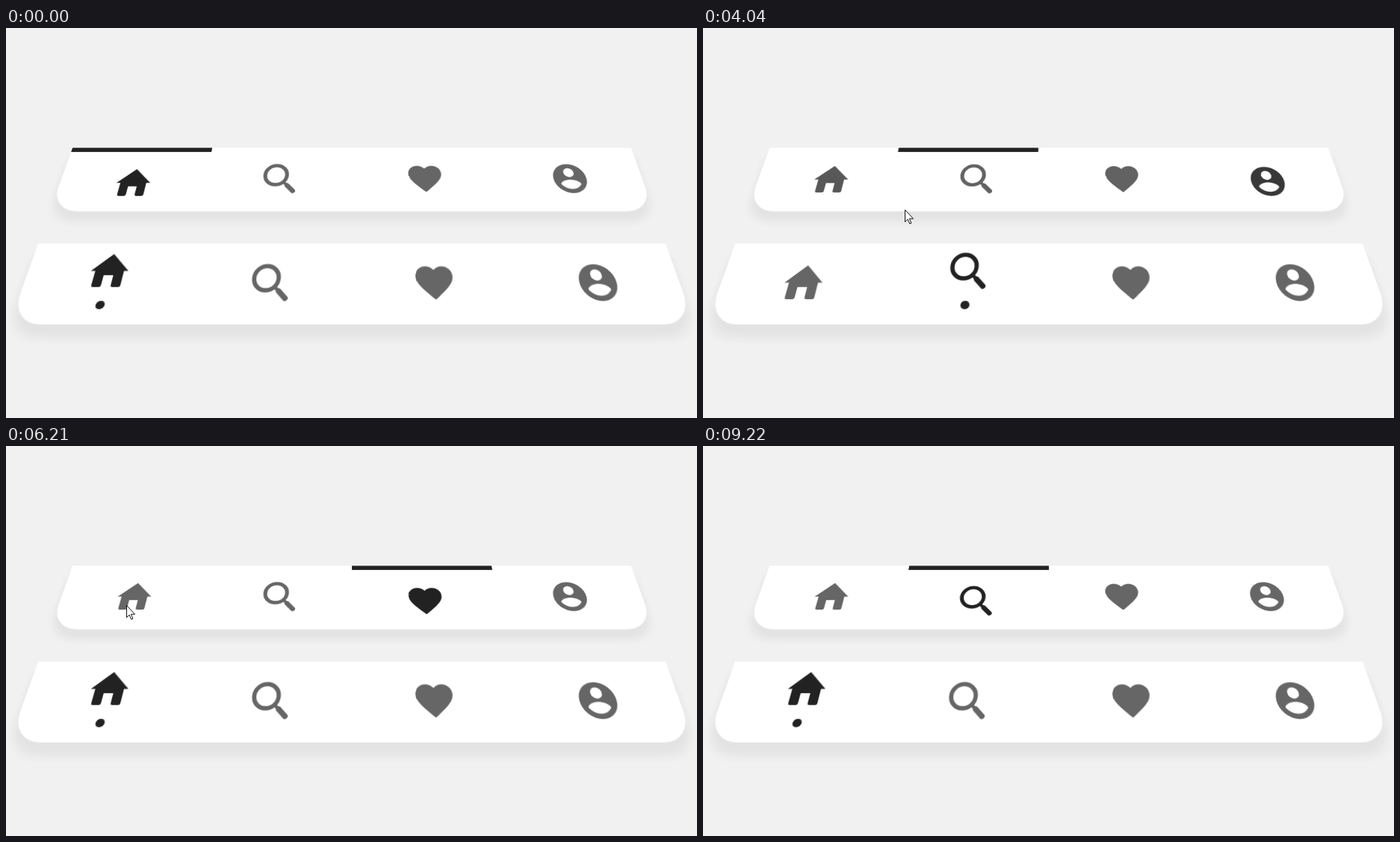
An HTML page that plays this animation: 925x522 px, repeating every 9520 ms.

```html
<!DOCTYPE html>
<html lang="en">
<head>
<meta charset="utf-8">
<title>Tab bars</title>
<style>
  html, body { margin: 0; width: 100%; height: 100%; overflow: hidden; background: #f1f1f1; }
  #stage { position: relative; width: 925px; height: 522px; overflow: hidden; }
  #plane { position: absolute; left: 462.5px; top: 261px; width: 0; height: 0;
           transform-origin: 0 0; transform: perspective(461.3px) rotateX(22deg); }
  .bar { position: absolute; left: -410px; width: 820px; height: 102.2px; background: #fff;
         border-radius: 0 0 37px 37px; box-shadow: 0 15px 12px rgba(0, 0, 0, .06); }
  .bar svg { position: absolute; top: 23.2px; width: 56px; height: 56px; overflow: visible; }
  .marker { position: absolute; left: 0; background: #222; }
  .line { top: 0; width: 205px; height: 7.4px; }
  .dot { top: 74px; left: 97.3px; width: 10.4px; height: 10.4px; border-radius: 50%; }
  #cursor { position: absolute; left: 0; top: 0; width: 14px; height: 22px; overflow: visible; }
</style>
</head>
<body>
<div id="stage">
  <div id="plane">
    <div class="bar" style="top:-119.2px"><div class="marker line"></div></div>
    <div class="bar" style="top:29px"><div class="marker dot"></div></div>
  </div>
  <svg id="cursor"><path d="M.5.5v16l3.6-3.5 2.6 6 2.2-.9-2.5-5.9h5.1z" fill="#fff" stroke="#111"/></svg>
</div>
<script>
const LOOP = 9520, TAB = 205, SLIDE = 170, FADE = 330;

const icons = [
  '<path d="M12 2.7 1.8 12.2h2.4V20q0 1 1 1h3.2q1 0 1-1v-5.4h5.2V20q0 1 1 1h3.2q1 0 1-1v-7.8h2.4z"/>',
  `<g fill="none" stroke="currentColor" stroke-linecap="round">
     <circle cx="9.7" cy="9.7" r="6.6" stroke-width="2.3"/>
     <path d="M14.6 14.6 17 17" stroke-width="1.8"/><path d="M16.8 16.8l3.6 3.7" stroke-width="2.9"/></g>`,
  `<path transform="translate(.2 .2)" d="M12 21 10.5 19.8C5.4 15.3 2 12.3 2 8.5 2 5.4 4.4 3 7.5 3c1.7 0 3.4.8 4.5 2.1
     C13.1 3.8 14.8 3 16.5 3 19.6 3 22 5.4 22 8.5c0 3.8-3.4 6.8-8.5 11.3z"/>`,
  `<circle cx="12" cy="12" r="10"/><g fill="#fff"><circle cx="12" cy="8" r="3.1"/>
     <path d="M12 19.2c-2.5 0-4.7-1.3-6-3.2 0-2 4-3.1 6-3.1s6 1.1 6 3.1c-1.3 1.9-3.5 3.2-6 3.2z"/></g>`
];

// Each click is [time, tab]; both bars start on tab 0
const clicks = [
  [[1800, 2], [2690, 1], [2900, 0], [3450, 3], [3830, 2], [3890, 1], [3945, 0],
   [4960, 2], [6300, 0], [6705, 1], [6790, 3], [7835, 1]],
  [[970, 1], [5300, 2], [5452, 3], [5700, 0]]
];
const lifts = [6.7, -15];

// Resting points of the cursor: [time, x, y]
const stops = [[150, 757, 523], [930, 355, 342], [1130, 355, 340], [1840, 565, 194],
  [2250, 712, 300], [2690, 380, 205], [2860, 528, 228], [3080, 150, 205], [3450, 740, 205],
  [3760, 740, 205], [4040, 270, 243], [4700, 590, 388], [4960, 560, 205], [5400, 780, 345],
  [5560, 262, 333], [5720, 104, 330], [6300, 165, 205], [6600, 165, 205], [6820, 821, 211],
  [7300, 800, 215], [7835, 365, 205], [8000, 470, 262], [8230, 520, 11], [8350, 430, 93],
  [8800, 430, 93], [9220, 838, 530]];

const ease = x => {
  x = Math.min(1, Math.max(0, x));
  return x * x * (3 - 2 * x);
};

// Every click starts a new transition from wherever the last one had got to
function follow(events, t, duration, goal) {
  let value = goal(0);
  events.forEach(([time, tab], i) => {
    const end = Math.min(t, events[i + 1]?.[0] ?? LOOP);
    value += (goal(tab) - value) * ease((end - time) / duration);
  });
  return value;
}

function cursorAt(t) {
  const next = stops.findIndex(([time]) => time > t);
  if (next < 1) return stops[0].slice(1);
  const [t0, x0, y0] = stops[next - 1], [t1, x1, y1] = stops[next];
  const p = ease((t - t0) / (t1 - t0));
  return [x0 + (x1 - x0) * p, y0 + (y1 - y0) * p];
}

const bars = [...document.querySelectorAll('.bar')].map((bar, b) => {
  const marker = bar.firstChild;
  bar.insertAdjacentHTML('beforeend', icons.map((shape, i) =>
    `<svg viewBox="0 0 24 24" fill="currentColor" style="left:${TAB * (i + .5) - 28}px">${shape}</svg>`).join(''));
  return { marker, tabs: [...bar.querySelectorAll('svg')], events: clicks[b], lift: lifts[b] };
});
const cursor = document.getElementById('cursor');
const start = performance.now();

function draw() {
  const t = (performance.now() - start) % LOOP;
  for (const { marker, tabs, events, lift } of bars) {
    marker.style.transform = `translateX(${TAB * follow(events, t, SLIDE, tab => tab)}px)`;
    tabs.forEach((icon, i) => {
      const lit = follow(events, t, FADE, tab => +(tab === i));
      const grey = Math.round(102 - 68 * lit);
      icon.style.color = `rgb(${grey},${grey},${grey})`;
      icon.style.transform = `translateY(${lift * lit}px)`;
    });
  }
  const [x, y] = cursorAt(t).map(Math.round);
  cursor.style.transform = `translate(${x}px,${y}px)`;
  requestAnimationFrame(draw);
}
draw();
</script>
</body>
</html>
```
